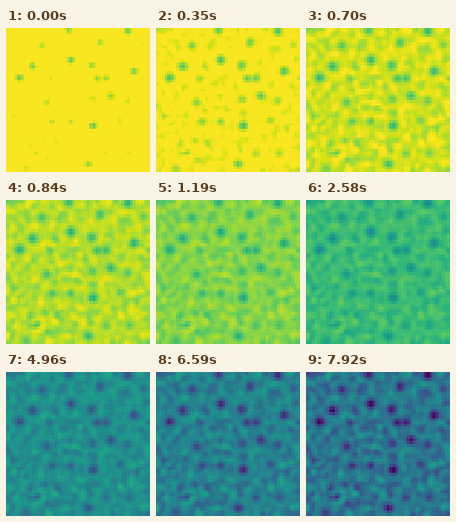
These frames come from a looping animation (180x180 px, 8000 ms). A matplotlib script:

```python
import matplotlib.pyplot as plt
import numpy as np
from matplotlib.animation import FuncAnimation

SIZE, CELLS = 180, 50
LOOP_MS, INTERVAL = 8000, 20

# Cold spots (x, y), deepest first.
SPOTS = [(109, 122), (81, 40), (152, 4), (17, 62), (33, 48), (160, 54),
         (131, 85), (103, 170), (78, 3), (107, 47), (114, 63), (125, 63),
         (118, 18), (45, 22), (51, 93), (58, 117), (81, 117), (25, 176),
         (108, 89), (152, 91), (143, 115), (154, 157), (125, 157), (172, 21)]

# Time (ms), mean level and contrast of the cooling field.
KEYS = np.array([(0, 1.11, 0.31), (770, 0.88, 0.23), (1190, 0.81, 0.20),
                 (2400, 0.69, 0.19), (4960, 0.49, 0.25), (7920, 0.385, 0.38)])

# The picture advances in held steps: quick, slow, then quick again.
STEPS = np.concatenate([
    [0],
    np.arange(210, 1191, 140),
    np.linspace(1420, 2220, 6),
    np.linspace(2580, 4960, 5),
    np.linspace(5400, 6100, 3),
    np.linspace(6590, 7570, 7),
    [7780, 7920],
])

centers = (np.arange(CELLS) + 0.5) * SIZE / CELLS


def bump(x, y, sigma):
    def profile(middle):
        return np.exp(-(centers - middle)**2 / (2 * sigma**2))
    return np.outer(profile(y), profile(x))


def blur(field, sigma):
    distance = centers[:, None] - centers[None, :]
    kernel = np.exp(-distance**2 / (2 * sigma**2))
    kernel /= kernel.sum(axis=1, keepdims=True)
    return kernel @ field @ kernel.T


def band_noise(seed):
    """Winding texture with one dominant wavelength."""
    white = np.random.default_rng(seed).standard_normal((CELLS, CELLS))
    field = blur(white, 3.4) - blur(white, 6)
    return field / field.std()


def make_field():
    texture = 0.2 * band_noise(8)
    wells = np.zeros((CELLS, CELLS))
    halo = np.zeros((CELLS, CELLS))
    for (x, y), depth in zip(SPOTS, np.linspace(1.12, 0.6, len(SPOTS))):
        wells = np.maximum(wells, depth * bump(x, y, 4.6))
        halo = np.maximum(halo, bump(x, y, 9))
    rim = 0.3 * np.clip(halo - wells, 0, 1)
    return np.clip(texture * (1 - halo) + rim - wells, -1.05, 0.4)


def field_at(ms):
    held = STEPS[np.searchsorted(STEPS, ms, side="right") - 1]
    times, levels, contrasts = KEYS.T
    level = np.interp(held, times, levels)
    contrast = np.interp(held, times, contrasts)
    return np.clip(level + contrast * FIELD, 0, 0.99)


FIELD = make_field()

fig = plt.figure(figsize=(SIZE / 100, SIZE / 100), dpi=100)
ax = fig.add_axes([0, 0, 1, 1])
ax.axis("off")
image = ax.imshow(field_at(0), cmap="viridis", vmin=0, vmax=1,
                  interpolation="nearest", aspect="auto")


def update(frame):
    image.set_data(field_at((frame + 0.5) * INTERVAL))
    return [image]


animation = FuncAnimation(fig, update, frames=LOOP_MS // INTERVAL,
                          interval=INTERVAL, repeat=True, repeat_delay=0,
                          blit=True)
plt.show()
```
